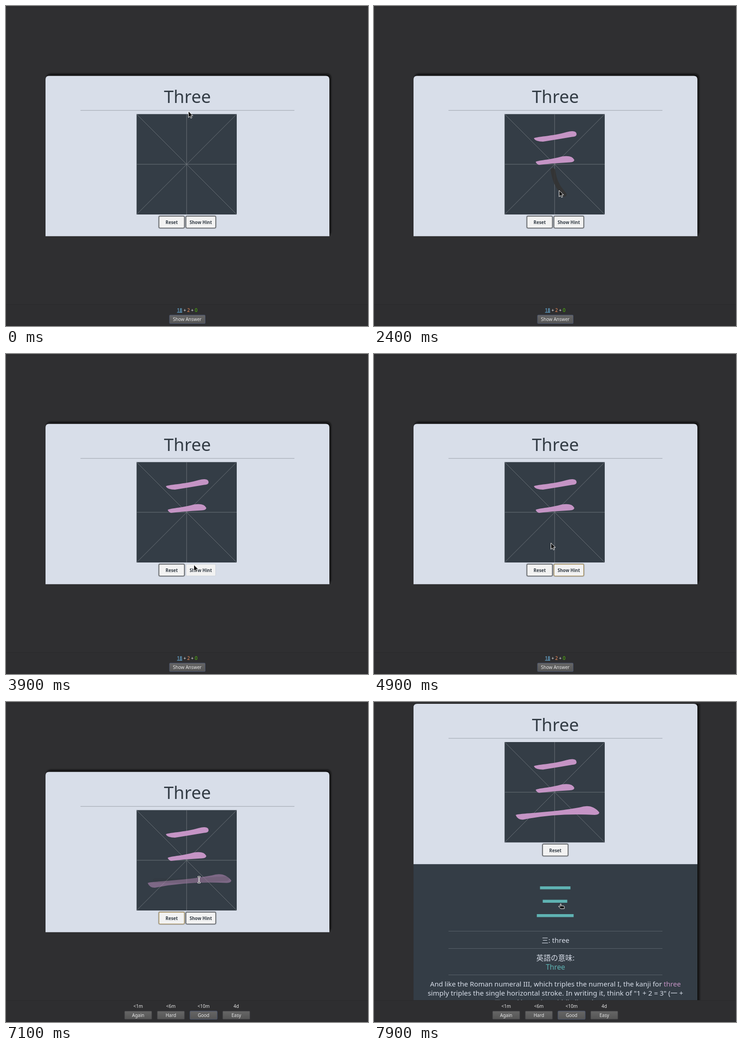
These frames come from a looping animation (797x703 px, 8 s). An HTML page:

```html
<!DOCTYPE html>
<html lang="en">
<head>
<meta charset="utf-8">
<title>Kanji writing card</title>
<style>
html, body { margin: 0; width: 100%; height: 100%; overflow: hidden; background: #2f2f31; }
svg { display: block; font-family: "Noto Sans", "Noto Sans CJK JP", "Noto Sans CJK", sans-serif; }
text { text-anchor: middle; white-space: pre; }
.ui { font-size: 10px; fill: #e8e8e8; }
.btn rect { fill: #f2f2f2; stroke: #55585c; stroke-width: 1.4; filter: drop-shadow(0 0 1px #0009); }
.btn text { font-size: 9.7px; font-weight: 700; fill: #343d46; }
.btn.hover rect { stroke: #c5cad3; stroke-width: .8; filter: none; }
.btn.focus rect { stroke: #a8905a; }
.flat { fill: url(#metal); stroke: #3d3d40; }
.flat.on { stroke: #4b5672; }
.grid { stroke: #7b8287; stroke-width: .8; fill: none; }
.pen { fill: none; stroke: #333; stroke-width: 10; stroke-linecap: round; stroke-linejoin: round; }
.rule { stroke: #5a636b; }
#inks { fill: #c594c5; }
#pointer { fill: #111; stroke: #fff; stroke-linejoin: round; }
</style>
</head>
<body>
<svg width="797" height="703">
  <defs>
    <linearGradient id="metal" x2="0" y2="1"><stop stop-color="#666"/><stop offset="1" stop-color="#555"/></linearGradient>
    <filter id="shadow" x="-10%" y="-10%" width="120%" height="120%"><feGaussianBlur stdDeviation="2"/></filter>
    <clipPath id="page"><rect y="4" width="797" height="651"/></clipPath>
    <clipPath id="sweep"><rect id="sweepBox" x="310" y="370" height="50"/></clipPath>
  </defs>
  <rect width="797" height="703" fill="#2f2f31"/>
  <rect y="3" width="797" height="1" fill="#29292b"/>

  <g clip-path="url(#page)">
    <g id="back">
      <rect x="91" y="2" width="625" height="660" fill="#0c0c0e" filter="url(#shadow)"/>
      <rect x="87" y="356" width="625" height="300" fill="#343d46"/>
      <path d="M365.500 405h67v6.500h-67zM371.500 434.500h54v6.500h-54zM358.500 466h81v6.500h-81z" fill="#5fb3b3"/>
      <path class="rule" d="M164 503.500H635M164 541.500H635M164 599.500H635"/>
      <g fill="#d8dee9" font-size="15.2">
        <text x="399.500" y="528.500">三: three</text>
        <text x="399.500" y="567.500" font-size="16">英語の意味:</text>
        <text x="399.500" y="587.500" font-size="15.700" fill="#5fb3b3">Three</text>
        <text x="399.500" y="624.500" font-size="15.050">And like the Roman numeral III, which triples the numeral I, the kanji for <tspan fill="#c594c5">three</tspan></text>
        <text x="399.500" y="645" font-size="15.300">simply triples the single horizontal stroke. In writing it, think of "1 + 2 = 3" (一 +</text>
        <text x="399.500" y="664.500">二), and keep the middle line shortest.</text>
      </g>
    </g>
    <g id="quiz">
      <rect id="cardShadow" x="90" y="149.500" width="625" height="354" rx="8" fill="#080809" filter="url(#shadow)"/>
      <path d="M87 505.800V161.500q0-8 8-8H704q8 0 8 8V505.800z" fill="#d8dee9"/>
      <text x="399.500" y="213" font-size="38.400" fill="#343d46">Three</text>
      <path d="M164 229.300H635" stroke="#9aa1ab"/>
      <rect x="287.500" y="237.500" width="220.500" height="220.500" fill="#343d46"/>
      <path class="grid" d="M287.500 237.500L508 458M508 237.500L287.500 458M397.700 237.500V458M287.500 347.700H508"/>
      <g id="inks"></g>
      <path id="hint" fill="#aaf" clip-path="url(#sweep)"/>
      <g id="pens"></g>
      <g id="reset"><rect x="336.800" y="461.800" width="55.800" height="25.800" rx="2"/><text x="364.800" y="479">Reset</text></g>
      <g id="show"><rect x="396.300" y="461.800" width="65.300" height="25.800" rx="2"/><text x="428.800" y="479">Show Hint</text></g>
    </g>
  </g>

  <rect y="655" width="797" height="48" fill="#2e2e30"/>
  <path d="M0 655.500H797M0 702.500H797" stroke="#29292b"/>
  <g class="ui" id="ask">
    <text x="399" y="671.500"><tspan fill="#77ccff" text-decoration="underline">18</tspan> + <tspan fill="#ff935b">2</tspan> + <tspan fill="#5c0">0</tspan></text>
    <rect class="flat on" x="360" y="679" width="78.500" height="18.500" rx="1.500"/>
    <text x="399" y="692">Show Answer</text>
  </g>
  <g class="ui" id="grade"></g>
  <path id="pointer"/>
</svg>
<script>
const $ = id => document.getElementById(id);
const clamp = v => Math.max(0, Math.min(1, v));
const ease = p => p * p * (3 - 2 * p);
const LOOP = 8000, STEP = 100, FADE = 300;
const HINT = 4100, RESET = 5700, GRADE = 7100, ANSWER = 7200;

// Brush strokes described by the corners of their outline.
const brush = [
  { tip: [352, 291], shoulder: [424, 277], crest: [446, 271.5], end: [446, 282], waist: [404, 293], belly: [372, 298] },
  { tip: [356, 343], shoulder: [414, 330.5], crest: [436, 327], end: [441, 338], waist: [398, 345], belly: [364, 349] },
  { tip: [312, 398], shoulder: [453, 381], crest: [480, 372], end: [496, 392], waist: [400, 393], belly: [328, 408] }
];

function outline({ tip: [x, y], shoulder, crest, end: [u, v], waist, belly }) {
  return `M${x} ${y}C${x + 1} ${y - 4} ${waist[0] - 9} ${y - 5} ${shoulder}Q${crest} ${u} ${v}` +
    `Q${u} ${v + 5} ${u - 10} ${v + 5.5}Q${waist} ${belly}Q${x + 4} ${belly[1]} ${x} ${y}Z`;
}

// Pointer path: a list of places with arrival times; some legs draw ink.
const path = [], pens = [];
const go = (t, x, y, bow = 0) => path.push({ t, x, y, bow });
function draw(a, from, b, to, bow) {
  go(a, ...from);
  go(b, ...to, bow);
  pens.push({ a, b });
}
function trace(i, a, b) {
  const { tip: [x, y], end: [u, v] } = brush[i];
  draw(a, [x + 16, y - 6], b, [u - 10, v - 4], 2);
}

go(0, 401, 231);
trace(0, 400, 900);
trace(1, 1500, 1800);
draw(2050, [394, 361], 2300, [419, 414], 5);
go(2400, 407, 405);
draw(2600, [330, 402], 2900, [356, 293], 4);
draw(3050, [440, 310], 3250, [450, 385], 4);
go(3900, 413, 463);
go(4500, 425, 508);
go(4900, 389, 415);
go(5150, 382, 377);
go(5650, 364, 470);
go(6000, 369, 305);
trace(0, 6100, 6300);
trace(1, 6400, 6550);
trace(2, 6650, 6820);
go(7100, 425, 391);
go(7550, 418, 462);
go(7900, 411, 444);

function pointer(t) {
  const i = path.findIndex(k => k.t > t);
  if (i < 0) return [path.at(-1).x, path.at(-1).y];
  const a = path[i - 1], b = path[i], p = ease((t - a.t) / (b.t - a.t));
  const dx = b.x - a.x, dy = b.y - a.y, side = b.bow * Math.sin(Math.PI * p) / Math.hypot(dx, dy);
  return [a.x + dx * p - dy * side, a.y + dy * p + dx * side];
}

const shapes = {
  arrow: "M.5 0V14L3.700 11L6 15.500L8.300 14.500L6.200 10H10.500Z",
  beam: "M-2.500 -6H-.8V5H-2.500V7H2.500V5H.8V-6H2.500V-8H-2.500Z",
  hand: "M-1 0Q0-1.500 1 0V4H6Q8 4 8 6V10H0L-5 5Q-4 3.500-1 5.500Z"
};

$("inks").innerHTML = brush.map(b => `<path d="${outline(b)}"/>`).join("");
$("hint").setAttribute("d", outline(brush[2]));
$("pens").innerHTML = pens.map(() => '<path class="pen"/>').join("");
$("grade").innerHTML = [["&lt;1m", "Again"], ["&lt;6m", "Hard"], ["&lt;10m", "Good"], ["4d", "Easy"]]
  .map(([wait, name], i) => {
    const x = 261 + 72 * i;
    return `<text x="${x + 30}" y="671.5">${wait}</text>
      <rect class="flat ${name === "Good" ? "on" : ""}" x="${x}" y="679" width="60" height="18" rx="1.5"/>
      <text x="${x + 30}" y="692">${name}</text>`;
  }).join("");

const visible = (el, on) => el.style.display = on ? "" : "none";

function showInk(t) {
  const starts = t < RESET ? [1000, 1900, LOOP] : [6300, 6550, 6950];
  [...$("inks").children].forEach((ink, i) =>
    ink.style.opacity = clamp(t < ANSWER ? (t - starts[i]) / FADE : (t - ANSWER) / 400));
  $("sweepBox").setAttribute("width", 190 * clamp((t - HINT) / FADE));
  $("hint").style.opacity = 1 - clamp((t - HINT - FADE) / FADE);
}

function showPens(t) {
  pens.forEach(({ a, b }, i) => {
    const line = $("pens").children[i], on = t > a && t < b + FADE && t < ANSWER;
    visible(line, on);
    if (!on) return;
    const end = Math.min(t, b), points = [];
    for (let s = a; s < end; s += 20) points.push(pointer(s));
    line.setAttribute("d", "M" + [...points, pointer(end)].join("L"));
    line.style.opacity = 1 - clamp((t - b) / FADE) ** 2;
  });
}

function render(t) {
  const answer = t >= ANSWER, [x, y] = pointer(t);
  for (const id of ["show", "cardShadow"]) visible($(id), !answer);
  visible($("back"), answer);
  visible($("ask"), t < GRADE);
  visible($("grade"), t >= GRADE);
  $("quiz").setAttribute("transform", `translate(0 ${answer ? -149.5 : 0})`);
  $("reset").setAttribute("transform", `translate(${answer ? 34.5 : 0} 0)`);
  showInk(t);
  showPens(t);

  const button = (id, left, right, focus) => {
    const hover = !answer && x > left && x < right && y > 461 && y < 488;
    $(id).setAttribute("class", "btn" + (hover ? " hover" : focus ? " focus" : ""));
  };
  button("show", 396, 462, t >= HINT && t < RESET);
  button("reset", 337, 393, t >= RESET && !answer);

  const kind = t > ANSWER ? "hand" : t >= GRADE ? "beam" : "arrow";
  $("pointer").setAttribute("d", shapes[kind]);
  $("pointer").setAttribute("transform", `translate(${x} ${y})`);
}

function tick(now) {
  render(Math.floor(now % LOOP / STEP) * STEP);
  requestAnimationFrame(tick);
}
render(0);
requestAnimationFrame(tick);
</script>
</body>
</html>
```
